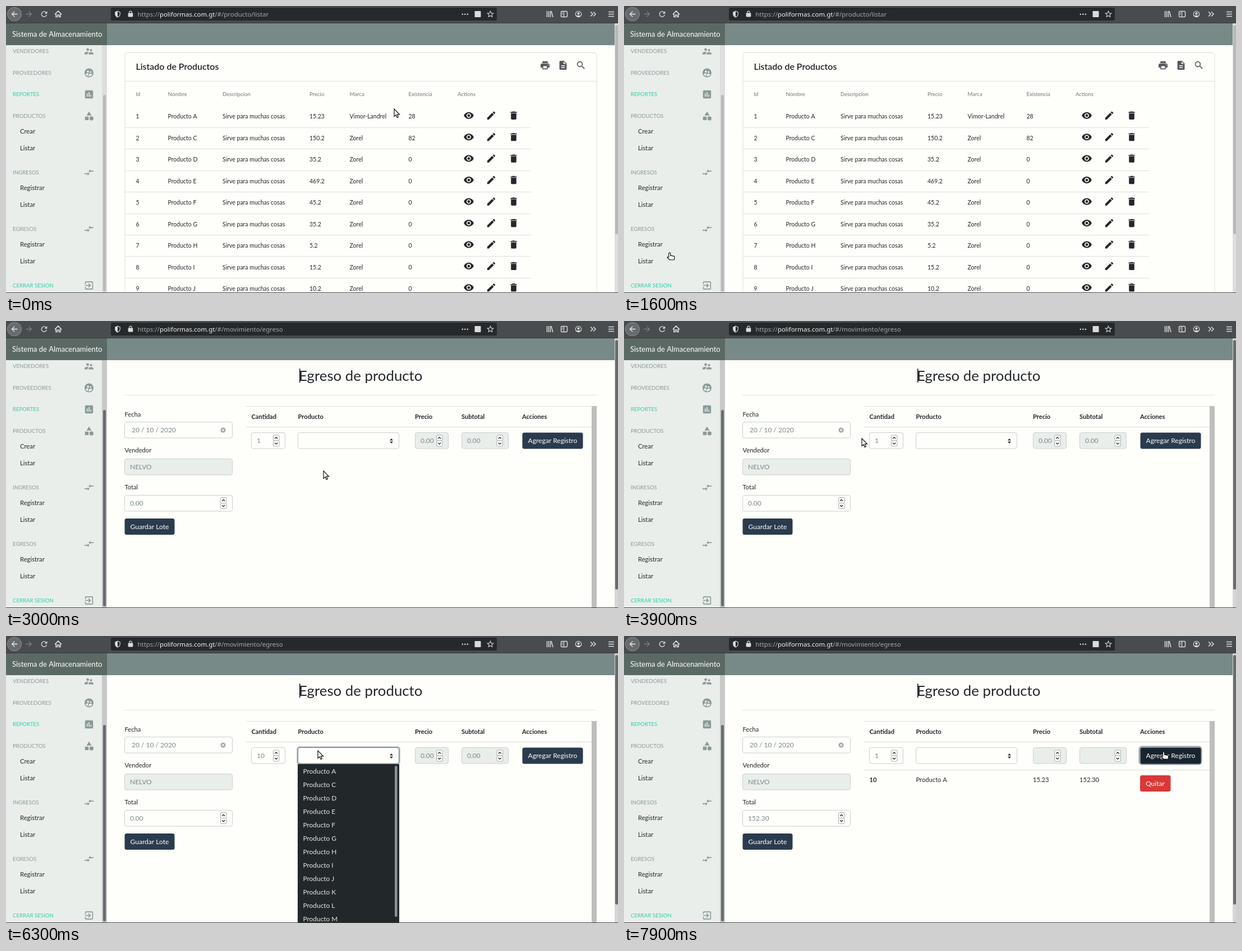
Recreate the animation shown at these times as an HTML page with a canvas. Size 1091x513 px, loop 8000 ms.

```html
<!DOCTYPE html>
<html lang="es">
<head>
<meta charset="utf-8">
<title>Sistema de Almacenamiento</title>
<style>
html, body { margin: 0; width: 100%; height: 100%; overflow: hidden; background: #fefefa; }
canvas { display: block; }
</style>
</head>
<body>
<canvas id="stage" width="1091" height="513"></canvas>
<script>
const c = document.getElementById('stage').getContext('2d');
const LATO = 'Lato, "Open Sans", sans-serif', NOTO = '"Noto Sans", "Open Sans", sans-serif';
const INK = '#23282b', GREY = '#8b9a98', GREEN = '#2fcfa5', NAVY = '#2a3b4d', PAPER = '#fefefa';
const SITE = 'poliformas.com.gt';

// 24-unit icon outlines
const ICONS = {
  eye: 'M12 4.5C7 4.5 2.73 7.61 1 12c1.73 4.39 6 7.5 11 7.5s9.27-3.11 11-7.5c-1.73-4.39-6-7.5-11-7.5zM12 17c-2.76 0-5-2.24-5-5s2.24-5 5-5 5 2.24 5 5-2.24 5-5 5zm0-8c-1.66 0-3 1.34-3 3s1.34 3 3 3 3-1.34 3-3-1.34-3-3-3z',
  pencil: 'M3 17.25V21h3.75L17.81 9.94l-3.75-3.75zM20.71 7.04c.39-.39.39-1.02 0-1.41l-2.34-2.34a1 1 0 0 0-1.41 0l-1.83 1.83 3.75 3.75z',
  bin: 'M6 19c0 1.1.9 2 2 2h8c1.1 0 2-.9 2-2V7H6zM19 4h-3.5l-1-1h-5l-1 1H5v2h14z',
  print: 'M19 8H5c-1.66 0-3 1.34-3 3v6h4v4h12v-4h4v-6c0-1.66-1.34-3-3-3zm-3 11H8v-5h8zm3-7a1 1 0 1 1 0-2 1 1 0 0 1 0 2zM18 3H6v4h12z',
  page: 'M14 2H6c-1.1 0-2 .9-2 2v16c0 1.1.9 2 2 2h12c1.1 0 2-.9 2-2V8zm2 16H8v-2h8zm0-4H8v-2h8zm-3-5V3.5L18.5 9z',
  search: 'M15.5 14h-.79l-.28-.27A6.5 6.5 0 1 0 13.73 14.43l.27.28v.79l5 4.99L20.49 19zm-6 0a4.5 4.5 0 1 1 0-9 4.5 4.5 0 0 1 0 9z',
  people: 'M16.5 12a2.5 2.5 0 1 0 0-5 2.5 2.5 0 0 0 0 5zM9 11a3 3 0 1 0 0-6 3 3 0 0 0 0 6zm7.5 3c-1.83 0-5.5.92-5.5 2.75V19h11v-2.25c0-1.83-3.67-2.75-5.5-2.75zM9 13c-2.33 0-7 1.17-7 3.5V19h7v-2.25c0-.85.33-2.34 2.37-3.47C10.5 13.1 9.66 13 9 13z',
  team: 'M12 2C6.5 2 2 6.5 2 12s4.5 10 10 10 10-4.5 10-10S17.5 2 12 2zm3.6 6.34a1.93 1.93 0 1 1 0 3.86 1.93 1.93 0 0 1 0-3.86zm-6-1.58a2.36 2.36 0 1 1 0 4.72 2.36 2.36 0 0 1 0-4.72zm0 9.13v3.75c-2.4-.75-4.3-2.6-5.14-4.96 1.05-1.12 3.67-1.69 5.14-1.69.53 0 1.2.08 1.9.22-1.64.87-1.9 2.02-1.9 2.68zM12 20l-.8-.04v-4.07c0-1.42 2.94-2.13 4.4-2.13 1.07 0 2.92.39 3.84 1.15C18.27 17.88 15.38 20 12 20z',
  chart: 'M19 3H5c-1.1 0-2 .9-2 2v14c0 1.1.9 2 2 2h14c1.1 0 2-.9 2-2V5c0-1.1-.9-2-2-2zM9 17H7v-7h2zm4 0h-2V7h2zm4 0h-2v-4h2z',
  shapes: 'M12 2l-5.5 9h11zM17.5 13a4.5 4.5 0 1 0 0 9 4.5 4.5 0 0 0 0-9zM3 13.5h8v8H3z',
  swap: 'M9 14H2v2h7v3l4-4-4-4zm6-1v-3h7V8h-7V5l-4 4z',
  exit: 'M10.09 15.59L11.5 17l5-5-5-5-1.41 1.41L12.67 11H3v2h9.67zM19 3H5a2 2 0 0 0-2 2v4h2V5h14v14H5v-4H3v4a2 2 0 0 0 2 2h14c1.1 0 2-.9 2-2V5c0-1.1-.9-2-2-2z',
  back: 'M20 11H7.8l5.6-5.6L12 4l-8 8 8 8 1.4-1.4L7.8 13H20z',
  reload: 'M17.65 6.35A8 8 0 1 0 19.73 14h-2.08A6 6 0 1 1 16.2 7.8L13 11h7V4z',
  lock: 'M18 9h-1V7A5 5 0 0 0 7 7v2H6a2 2 0 0 0-2 2v9a2 2 0 0 0 2 2h12a2 2 0 0 0 2-2v-9a2 2 0 0 0-2-2zM9 9V7a3 3 0 0 1 6 0v2z',
  shield: 'M12 1L3 5v6c0 5.5 3.8 10.7 9 12 5.2-1.3 9-6.5 9-12V5zm0 2.2l7 3.1V11c0 4.5-3 8.7-7 9.9zM12 3.2L5 6.3V11c0 4.5 3 8.7 7 9.9V18C9 17 7.5 14 7.5 11V8L12 6z',
  star: 'M22 9.24l-7.19-.62L12 2 9.19 8.63 2 9.24l5.46 4.73L5.82 21 12 17.27 18.18 21l-1.63-7.03zM12 15.4l-3.76 2.27 1-4.28-3.32-2.88 4.38-.38L12 6.1l1.71 4.04 4.38.38-3.32 2.88 1 4.28z',
  user: 'M12 2a10 10 0 1 0 0 20 10 10 0 0 0 0-20zm0 2a8 8 0 0 1 6 13.3c-1.5-1.8-10.5-1.8-12 0A8 8 0 0 1 12 4zm0 2.5a3.7 3.7 0 1 0 0 7.4 3.7 3.7 0 0 0 0-7.4z'
};
for (const k in ICONS) ICONS[k] = new Path2D(ICONS[k]);
const ARROW = new Path2D('M0 0V13.5L3.2 10.7 5.2 15.5 7.4 14.5 5.4 9.9H9.5z');
const HAND = new Path2D('M-1.5 1Q0-1 1.5 1V5.2L7.5 6.3Q9 6.8 8.8 8.5L8 13H0L-4 9Q-4 7-1.5 8.3z');
const BEAM = new Path2D('M-3 0H-1L0 1 1 0H3M0 1V13M-3 14H-1L0 13 1 14H3M-1.5 8H1.5');

// y is the middle of the capital letters
function text(s, x, y, size, color = INK, weight = 400, font = LATO) {
  c.font = `${weight} ${size}px ${font}`;
  c.fillStyle = color;
  c.fillText(s, x, y + size * .36);
  return x + c.measureText(s).width;
}
function rect(x, y, w, h, color) { c.fillStyle = color; c.fillRect(x, y, w, h); }
function round(x, y, w, h, r, fill, line, width = 1) {
  c.beginPath();
  c.roundRect(x, y, w, h, r);
  if (fill) { c.fillStyle = fill; c.fill(); }
  if (line) { c.strokeStyle = line; c.lineWidth = width; c.stroke(); }
}
function shape(path, x, y, scale, fill, line, width = 1) {
  c.save();
  c.translate(x, y);
  c.scale(scale, scale);
  if (fill) { c.fillStyle = fill; c.fill(path); }
  if (line) { c.strokeStyle = line; c.lineWidth = width; c.stroke(path); }
  c.restore();
}
function icon(name, x, y, color = INK, size = 19.2) {
  shape(ICONS[name], x - size / 2, y - size / 2, size / 24, color);
}
function lines(d, color, width = 1) { shape(new Path2D(d), 0, 0, 1, null, color, width); }

function toolbar(path) {
  const light = '#d9dbdc', dim = '#a5a9ac';
  rect(0, 0, 1091, 31, '#494c4f');
  rect(0, 30, 1091, 1, '#36393b');
  round(2.5, 2.5, 25, 24, 12.5, '#686b6e', '#909395');
  icon('back', 15, 14.5, '#eee', 16);
  c.save(); c.translate(41, 14.5); c.scale(-1, 1); icon('back', 0, 0, '#7d8083', 16); c.restore();
  icon('reload', 68, 14.5, light, 16);
  lines('M87 15L93 9 99 15M89 14V19.5H91.5V16H94.5V19.5H97V14', light, 1.6);
  round(187, 3, 688, 23, 3, '#25292c');
  icon('shield', 199, 14.5, light, 13);
  icon('lock', 222, 14, light, 13);
  let x = text('https://', 234.5, 14.5, 11.45, dim, 400, NOTO);
  x = text(SITE, x, 14.5, 11.45, '#f2f3f3', 400, NOTO);
  text(path, x, 14.5, 11.45, dim, 400, NOTO);
  for (let i = 0; i < 3; i++) round(812.5 + i * 4.5, 13.5, 2.6, 2.6, 1.3, light);
  round(835.5, 9, 11, 11, 1, light);
  icon('star', 863.5, 14.5, light, 16);
  lines('M964.5 9V20M967.5 9V20M970.5 9V20M972 9L975 20', light, 1.5);
  round(989.5, 9.5, 11, 10, 1.5, null, light, 1.4);
  lines('M994.5 9.5V19.5M991 12.5H993M991 15H993', light, 1.2);
  icon('user', 1020.5, 14.5, light, 14);
  lines('M1042 10.5L1046 14.5 1042 18.5M1047 10.5L1051 14.5 1047 18.5', light, 1.6);
  lines('M1074 10.5H1084M1074 14.5H1084M1074 18.5H1084', light, 1.5);
}

function sidebar() {
  rect(0, 70, 171, 443, '#e9eeeb');
  rect(0, 31, 180, 39, '#5b6964');
  text('Sistema de Almacenamiento', 11, 50.5, 13, '#fff');
  const groups = [['VENDEDORES', 81, 'people'], ['PROVEEDORES', 119.5, 'team'], ['REPORTES', 158, 'chart', GREEN],
    ['PRODUCTOS', 196.5, 'shapes', GREY, 'Crear'], ['INGRESOS', 297.5, 'swap', GREY, 'Registrar'],
    ['EGRESOS', 398.5, 'swap', GREY, 'Registrar'], ['CERRAR SESION', 499.5, 'exit', GREEN]];
  for (const [name, y, sign, color = GREY, first] of groups) {
    text(name, 12, y, 9.65, color);
    icon(sign, 148, y, GREY);
    if (first) { text(first, 25, y + 27.5, 11.25); text('Listar', 25, y + 57.5, 11.25); }
  }
}

// the bars darken once the window gets the focus
function scrollbars(focused, pageThumb) {
  const thumb = focused ? '#676c6e' : '#b6b9b7';
  rect(171, 70, 9, 443, focused ? '#c6c9c7' : '#dcdfdd');
  round(173, 159, 5, 351, 2.5, thumb);
  rect(1085, 31, 6, 482, focused ? '#d4d7d5' : '#dcdfdd');
  round(1086, 34, 5, pageThumb, 2.5, thumb);
}

function productList(t) {
  round(212, 83.5, 841, 450, 4, null, '#dddfdc');
  rect(212, 134, 841, 1, '#dddfdc');
  text('Listado de Productos', 231.5, 108.5, 15.97, '#111', 500);
  icon('print', 961, 106, '#555a5c');
  icon('page', 993, 106, '#555a5c');
  icon('search', 1025, 106, '#555a5c');
  const cols = [231.5, 288.5, 386, 541, 612.5, 717.5, 805];
  ['Id', 'Nombre', 'Descripcion', 'Precio', 'Marca', 'Existencia', 'Actions']
    .forEach((s, i) => text(s, cols[i], 157.5, 9.6, '#72777a'));
  const hover = step([[0, -1], [100, 0], [900, 3], [1000, 4], [1100, 5], [1200, 6], [1300, -1]], t);
  const prices = ['15.23', '150.2', '35.2', '469.2', '45.2', '35.2', '5.2', '15.2', '10.2'];
  prices.forEach((price, i) => {
    const y = 197.7 + 38.45 * i, last = Math.round(y + 20);
    if (hover === i) rect(213, last - 38, 723, 38, t === 100 ? '#f5f5f2' : '#ecedea');
    rect(212, last - 1, 724, 1, '#dddfdc');
    [i + 1, 'Producto ' + 'ACDEFGHIJ'[i], 'Sirve para muchas cosas', price, i ? 'Zorel' : 'Vimor-Landrel', [28, 82][i] || 0]
      .forEach((s, k) => text(s, cols[k], y, 10.5));
    icon('eye', 825, y - 2);
    icon('pencil', 865, y - 2);
    icon('bin', 905, y - 2);
  });
}

function field(x, y, w, value, { off, focus, pad = 10 } = {}) {
  if (focus) round(x - .5, y - .5, w + 1, 30, 4, null, '#b9c3cc', 3);
  round(x + .5, y + .5, w - 1, 28.5, 3.5, off ? '#e9eeeb' : PAPER, focus ? '#5d7790' : '#cbd0d0');
  text(value, x + pad, y + 15, 12, '#7b8a8b');
}
function spinner(x, y) {
  round(x - 5, y - 10, 10.5, 10, 2, '#fff', '#a9adad');
  round(x - 5, y, 10.5, 10, 2, '#fff', '#a9adad');
  lines(`M${x - 2.3} ${y - 3.7}l2.5-2.5 2.5 2.5M${x - 2.3} ${y + 3.7}l2.5 2.5 2.5-2.5`, '#222', 1.3);
}
function button(s, x, y, w, color) {
  round(x, y, w, 29, 3.5, color);
  text(s, x + 10, y + 14.5, 12.05, '#fff');
}

function form(t) {
  const done = t >= 7700, picked = t >= 7000 && !done, open = t >= 6300 && t < 7000;
  text('Egreso de producto', 522, 97.5, 25.8);
  rect(211, 132, 842, 1, '#e2e4e0');
  text('Fecha', 211.5, 166.5, 11.2);
  field(211, 180, 193, '20 / 10 / 2020', { pad: 13 });
  round(382.5, 190.5, 9, 9, 4.5, '#a0a8a8');
  lines('M385.2 193.2l3.6 3.6m0-3.6l-3.6 3.6', '#fff', 1.1);
  text('Vendedor', 211.5, 230.5, 11.2);
  field(211, 246, 193, 'NELVO', { off: true });
  text('Total', 211.5, 296.5, 11.2);
  field(211, 311, 193, done ? '152.30' : '0.00');
  spinner(387.5, 325.5);
  button('Guardar Lote', 211.5, 353, 89, NAVY);

  rect(428, 152, 616, 1, '#dddfdc');
  rect(428, 189, 616, 1, '#dddfdc');
  rect(1044, 152, 9, 361, '#bebfbd');
  const cols = [437.5, 520.5, 729, 812, 920];
  ['Cantidad', 'Producto', 'Precio', 'Subtotal', 'Acciones']
    .forEach((s, i) => text(s, cols[i], 171, 11.1, INK, 700));
  const typed = t >= 5100 && !done;
  field(437, 199, 61, typed ? '10' : '1', { focus: t >= 4200 && t < 6300 });
  if (t >= 5100 && t < 5300) rect(462, 208, 1, 13, INK);
  spinner(481.5, 214);
  field(520, 199, 181, picked ? 'Producto A' : '', { focus: t >= 6300 && !done });
  shape(new Path2D('M-3 -1L0 -4.5 3 -1zM-3 1L0 4.5 3 1z'), 687, 214.5, 1, '#2b3033');
  field(729, 199, 60, done ? '' : picked ? '15.23' : '0.00', { off: true });
  spinner(772.5, 214);
  field(812, 199, 84, done ? '' : picked ? '152.30' : '0.00', { off: true });
  spinner(880, 214);
  if (done) round(919, 198, 110, 31, 4.5, null, '#9aa6b0', 3);
  button('Agregar Registro', 920.5, 199.5, 108, t >= 7600 ? '#19242f' : NAVY);
  if (done) {
    rect(428, 239, 616, 1, '#dddfdc');
    text('10', 437.5, 257, 11.2, INK, 700);
    ['Producto A', '15.23', '152.30'].forEach((s, i) => text(s, cols[i + 1], 257, 11.2));
    button('Quitar', 920, 249, 54.5, '#da3838');
  }
  if (open) {
    rect(520, 229, 181, 284, '#22272a');
    if (t >= 6500) rect(521, 230, 171, 23, '#3b4449');
    [...'ACDEFGHIJKLM'].forEach((s, i) => text('Producto ' + s, 529.5, 241.5 + 24.05 * i, 11.9, '#e4e7e8'));
    round(693, 232, 4.5, 270, 2, '#8c9092');
  }
}

function status(path, w) {
  round(-2, 493, w + 2, 22, 3, '#24292c', '#4a4f52');
  text('https://' + SITE + path, 2, 503, 10.9, '#eceeee', 400, NOTO);
}

function step(list, t) {
  return list.filter(k => k[0] <= t).pop()[1];
}
const PATH = [[0, 692, 184], [100, 700, 189], [300, 713, 199], [400, 713, 199], [600, 722, 204], [800, 722, 204],
  [900, 518, 274], [1300, 175, 395], [1700, 50, 456], [1900, 50, 454], [2300, 51, 428], [2500, 51, 428],
  [3000, 566, 268], [3300, 597, 226], [3500, 594, 224], [3900, 424, 210], [4300, 454, 209], [5600, 454, 209],
  [6000, 556, 205], [6300, 556, 205], [6700, 560, 235], [7100, 560, 235], [7600, 962, 207], [8000, 962, 207]];
const POINTER = [[0, ARROW], [200, HAND], [1300, ARROW], [1500, HAND], [2700, ARROW], [4000, BEAM], [5800, ARROW], [7600, HAND]];

function pointer(t) {
  const i = PATH.findIndex(k => k[0] > t), [t0, x0, y0] = PATH[i - 1], [t1, x1, y1] = PATH[i];
  const p = (t - t0) / (t1 - t0), x = x0 + (x1 - x0) * p, y = y0 + (y1 - y0) * p;
  const look = step(POINTER, t);
  if (look === BEAM) {
    shape(BEAM, x, y, 1, null, '#fff', 3);
    shape(BEAM, x, y, 1, null, '#111', 1.3);
  } else shape(look, x, y, 1, '#fff', '#111', 1.2);
}

function draw(t) {
  const focused = t >= 2500, onForm = t >= 2600;
  rect(0, 0, 1091, 513, PAPER);
  if (onForm) form(t); else productList(t);
  toolbar(onForm ? '/#/movimiento/egreso' : '/#/producto/listar');
  rect(180, 31, 905, 39, '#788a87');
  sidebar();
  scrollbars(focused, onForm ? 446 : 374);
  if (focused && !onForm) rect(232, 99, 1, 18, '#111');
  if (onForm && t < 4200 || t >= 6300 && t < 6500 || t >= 7700) rect(523, 85, 1.5, 25, '#111');
  rect(0, 512, 1091, 1, '#3c4042');
  if (t >= 1700 && t < 2100) status('/#/movimiento/egreso/listar', 283);
  else if (t >= 2100 && t < 2700) status('/#/movimiento/egreso', 253);
  pointer(t);
}

function frame() {
  draw(Math.floor(performance.now() % 8000 / 100) * 100);
  requestAnimationFrame(frame);
}
frame();
</script>
</body>
</html>
```
